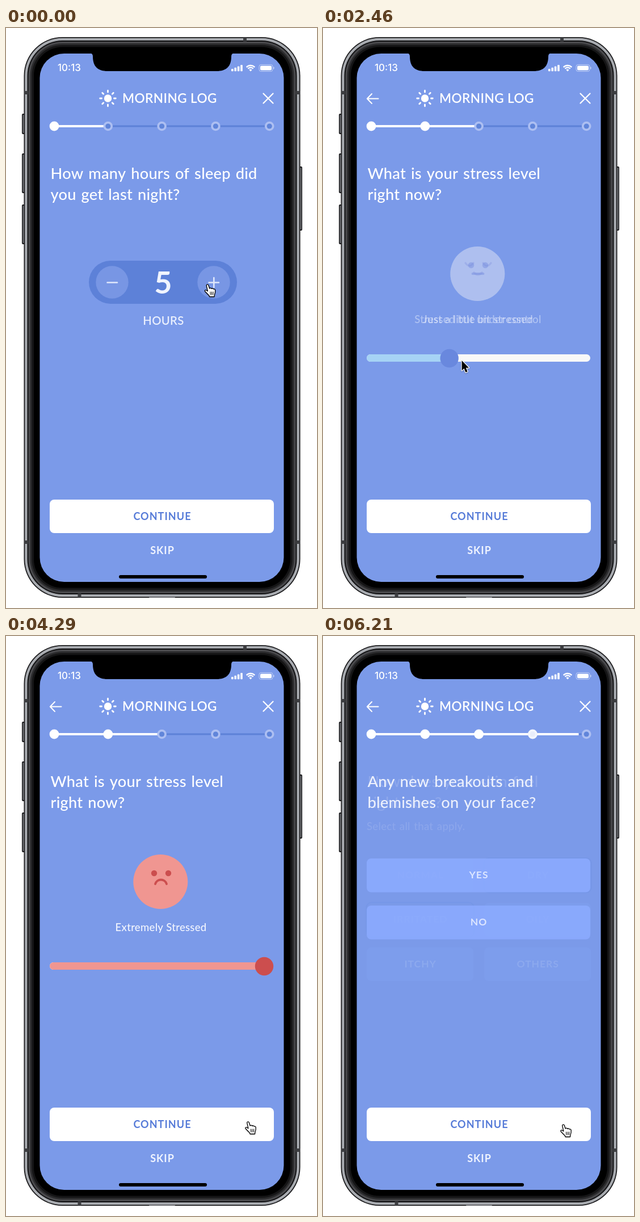
Animation, 548 px wide and 1022 px high, one loop 6.24 s. Source, as an HTML page with a canvas:

```html
<!DOCTYPE html>
<html lang="en">
<head>
<meta charset="utf-8">
<title>Morning log</title>
<style>
html, body { margin: 0; width: 100%; height: 100%; overflow: hidden; background: #fff; }
canvas { display: block; width: 548px; height: 1022px; }
</style>
</head>
<body>
<canvas id="stage"></canvas>
<script>
const LOOP = 6240;
const W = 548, H = 1022;
const BG = '#7b9ae9', DEEP = '#5d81d8', TAG = '#8cabff', WHITE = '#fff';
const canvas = document.getElementById('stage');
const g = canvas.getContext('2d');
const dpr = window.devicePixelRatio || 1;
canvas.width = W * dpr;
canvas.height = H * dpr;

const clamp = v => Math.max(0, Math.min(1, v));
const smooth = p => p * p * (3 - 2 * p);
const lerp = (a, b, p) => a + (b - a) * p;
// Ease-out from 0 to 1, beginning at `start`
const ease = (t, start, dur = 200) => 1 - (1 - clamp((t - start) / dur)) ** 2;
const rgb = c => `rgb(${c.map(Math.round)})`;
const mix = (a, b, p) => a.map((v, i) => lerp(v, b[i], p));

function fade(a, draw) {
  if (a <= 0) return;
  g.save();
  g.globalAlpha *= a;
  draw();
  g.restore();
}

function box(x, y, w, h, r, fill) {
  g.beginPath();
  g.roundRect(x, y, w, h, r);
  g.fillStyle = fill;
  g.fill();
}

function disc(x, y, r, fill) {
  g.beginPath();
  g.arc(x, y, r, 0, 7);
  g.fillStyle = fill;
  g.fill();
}

function stroke(d, color, width, cap = 'round') {
  g.strokeStyle = color;
  g.lineWidth = width;
  g.lineCap = cap;
  g.lineJoin = 'round';
  g.stroke(new Path2D(d));
}

function text(s, x, y, size, o = {}) {
  g.font = `${o.weight || 500} ${size}px ${o.font || 'Lato'}, sans-serif`;
  g.letterSpacing = (o.gap || 0) + 'px';
  g.wordSpacing = (o.word || 0) + 'px';
  g.textAlign = o.align || 'center';
  g.fillStyle = o.color || WHITE;
  g.fillText(s, x, y);
}

// ---- phone ----

function phone() {
  for (const [y, h] of [[151, 36], [221, 70], [311, 70]]) {
    box(28, y, 6, h, 2, '#1c1c1e');
    box(29.5, y + 2, 3, h - 4, 1, '#77797d');
  }
  box(516, 244, 6, 113, 2, '#1c1c1e');
  box(517.5, 246, 3, 109, 1, '#77797d');

  const shells = [[0, '#1d1d1f'], [1.8, '#a9acb1'], [6, '#111113'], [8, '#4a4a4d'], [11, '#2b2b2d'], [14, '#151516'], [17.5, '#000']];
  for (const [i, c] of shells) box(31.5 + i, 16 + i, 487 - 2 * i, 988 - 2 * i, 68 - i, c);

  for (const y of [111, 903]) {
    box(32, y, 7, 6, 0, '#3c3d40');
    box(511, y, 7, 6, 0, '#3c3d40');
  }
  box(418, 16.5, 6, 7, 0, '#3c3d40');
  box(126.5, 996.5, 6, 7, 0, '#3c3d40');
  box(252, 1001.5, 46, 2.5, 1, '#77797d');

  box(59.5, 45, 430, 931, 43, BG);
  g.fillStyle = '#000';
  g.fill(new Path2D('M148 44 Q153 45 153 50 C153 68 162 76 179 76 H371 C388 76 397 68 397 50 Q397 45 402 44 Z'));
}

function statusBar() {
  text('10:13', 91, 76, 17, { font: 'Inter', align: 'left' });
  for (let i = 0; i < 4; i++) box(397 + i * 5.4, 72 - i * 2.3, 3.6, 4.2 + i * 2.3, 1, WHITE);

  g.strokeStyle = WHITE;
  g.lineCap = 'butt';
  g.lineWidth = 2.3;
  for (const r of [6.3, 10]) {
    g.beginPath();
    g.arc(431, 76, r, -Math.PI * 0.76, -Math.PI * 0.24);
    g.stroke();
  }
  g.beginPath();
  g.moveTo(431, 76.5);
  g.arc(431, 76, 3.4, -Math.PI * 0.78, -Math.PI * 0.22);
  g.fillStyle = WHITE;
  g.fill();

  fade(0.5, () => {
    g.beginPath();
    g.roundRect(446, 64.5, 24, 12, 3.5);
    g.lineWidth = 1;
    g.stroke();
    box(471, 68.5, 1.5, 4, 1, WHITE);
  });
  box(448, 66.5, 20, 8, 2, WHITE);
}

// ---- fixed interface ----

function header(back) {
  disc(179.5, 124, 6.7, WHITE);
  for (let i = 0; i < 8; i++) {
    const c = Math.cos(i * Math.PI / 4), s = Math.sin(i * Math.PI / 4);
    stroke(`M${179.5 + 11 * c} ${124 + 11 * s} L${179.5 + 13.8 * c} ${124 + 13.8 * s}`, WHITE, 2.8);
  }
  text('MORNING LOG', 205, 132, 22.5, { weight: 600, gap: 0.45, align: 'left' });
  stroke('M453.5 115.5 L470.5 132.5 M470.5 115.5 L453.5 132.5', WHITE, 2.3);
  fade(back, () => stroke('M97.5 124.5 H78 M86 116 L77.8 124.5 L86 133', WHITE, 2));
}

function stepper(pos) {
  const X = i => 85 + i * 94.8;
  box(X(0), 171.5, X(4) - X(0), 3, 0, DEEP);
  box(X(0), 171, X(Math.min(pos + 1, 4)) - X(0), 4, 0, WHITE);
  for (let i = 0; i < 5; i++) {
    const full = clamp(pos - i + 1);
    if (full < 1) {
      disc(X(i), 173, 8.3, '#adbff2');
      disc(X(i), 173, 4.6, '#6085da');
    }
    fade(full, () => disc(X(i), 173, 8.4, WHITE));
  }
}

function footer() {
  box(77, 831, 395, 59, 8, WHITE);
  text('CONTINUE', 275.5, 867, 18, { weight: 700, gap: 1.05, color: '#567bd8' });
  text('SKIP', 275.5, 927, 18, { weight: 700, gap: 1, color: '#f0f4ff' });
  box(199, 964, 155, 6, 3, '#000');
}

function question(a, b) {
  const o = { align: 'left', gap: 0.25, word: 1.8 };
  text(a, 78.5, 266, 27.2, o);
  text(b, 78.5, 303, 27.2, o);
}

// ---- screens ----

function hours(t) {
  question('How many hours of sleep did', 'you get last night?');
  box(146, 410, 261, 76, 38, DEEP);
  disc(187, 448, 28.7, '#7896e4');
  disc(366, 448, 28.7, '#7896e4');
  stroke('M178.5 448.5 H196 M357.5 448.5 H375 M366.3 440 V457', '#dfe7fb', 2.6);
  const six = ease(t, 135, 100), seven = ease(t, 435, 100);
  const digit = (s, a) => fade(a, () => text(s, 277, 468, 54, { weight: 700, color: '#f0f4fe' }));
  digit('5', 1 - six);
  digit('6', six * (1 - seven));
  digit('7', seven);
  text('HOURS', 277.5, 523, 20.3, { weight: 600, gap: 0.3, color: '#e9effd' });
}

const moods = [
  { label: 'Not stressed at all', face: [172, 192, 246], dark: [72, 108, 210], fill: [166, 211, 245] },
  { label: 'Just a little bit stressed', face: [165, 211, 245], dark: [100, 134, 222], fill: [166, 211, 245] },
  { label: 'Stressed but under control', face: [207, 199, 237], dark: [112, 138, 222], fill: [166, 211, 245] },
  { label: 'Very Stressed', face: [253, 211, 188], dark: [224, 139, 91], fill: [253, 211, 188] },
  { label: 'Extremely Stressed', face: [240, 150, 145], dark: [204, 78, 78], fill: [240, 150, 145] }
];
const mouths = [
  'M263 430 Q273 441 283 430',
  'M266 431 Q273 438 280 431',
  'M263.5 433 H282.5',
  'M267 434.5 C268.5 427 277.5 427 279 434.5',
  'M263 437 C266 427 280 427 283 437'
];
const moodTimes = [2060, 2410, 3250, 3765];

function mood(i) {
  const m = moods[i], dark = rgb(m.dark);
  disc(272.3, 433, 48, rgb(m.face));
  if (i < 2) {
    stroke('M251 414 Q258 424 265 414 M282 414 Q289 424 296 414', dark, 3.2);
  } else {
    disc(261, 418, 5.2, dark);
    disc(286, 418, 5.2, dark);
  }
  stroke(mouths[i], dark, 3.8);
  text(m.label, 273, 520, 18.5, { gap: 0.3, color: '#f2f5fe' });
}

function stress(t) {
  question('What is your stress level', 'right now?');
  const next = moodTimes.filter(s => t >= s).length;
  const last = Math.max(0, next - 1);
  const p = next ? ease(t, moodTimes[next - 1]) : 1;
  if (last !== next) fade(1 - p, () => mood(last));
  fade(p, () => mood(next));

  const x = t < 1850 ? 93 : t > 3900 ? 455 : pointer(t)[0] - 22;
  box(77, 575, 394, 13, 6.5, '#f8f8f8');
  box(77, 575, x - 77, 13, 6.5, rgb(mix(moods[last].fill, moods[next].fill, p)));
  disc(x, 582, 16.2, rgb(mix(moods[last].dark, moods[next].dark, p)));
}

function choice(label, x, y, w, picked = 0) {
  fade(1 - picked, () => box(x, y, w, 59.5, 8, TAG));
  fade(picked, () => {
    g.beginPath();
    g.roundRect(x - 0.5, y - 0.8, w + 1, 61, 9);
    g.strokeStyle = '#5e82da';
    g.lineWidth = 2;
    g.stroke();
  });
  text(label, x + w / 2 + 0.5, y + 35, 17.5, { weight: 700, gap: 0.95, color: '#eaf0ff' });
}

const skinTypes = ['NORMAL', 'DRY', 'IRRITATED', 'OILY', 'ITCHY', 'OTHERS'];

function skin(t) {
  question('How does your skin feel', 'right now?');
  text('Select all that apply.', 77, 342, 18.5, { align: 'left', gap: 0.3, word: 1.5, color: '#eef3fe' });
  const picked = { DRY: ease(t, 5400, 100), IRRITATED: ease(t, 5120, 100) };
  skinTypes.forEach((name, i) =>
    choice(name, 77 + (i % 2) * 207, 392 + (i >> 1) * 78.3, 188.3, picked[name]));
}

function breakouts() {
  question('Any new breakouts and', 'blemishes on your face?');
  choice('YES', 77, 392, 394, 0);
  choice('NO', 77, 475, 394, 0);
}

// ---- pointer ----

// time, x, y of the tip; the slider is dragged between 1850 and 3900
const path = [
  [0, 355, 452], [560, 355, 452], [1000, 357.5, 884], [1090, 357.5, 884],
  [1650, 115, 588], [1850, 115, 588], [2460, 244.5, 586], [3630, 387, 578],
  [3900, 477, 580], [3950, 477, 580], [4230, 426.5, 856], [4640, 426.5, 856],
  [5050, 225, 505], [5200, 225, 505], [5400, 298.8, 415], [5450, 298.8, 415],
  [5900, 423.5, 861], [LOOP, 423.5, 861]
];

function pointer(t) {
  let i = 0;
  while (i < path.length - 2 && t >= path[i + 1][0]) i++;
  const a = path[i], b = path[i + 1];
  let p = clamp((t - a[0]) / (b[0] - a[0]));
  if (a[0] < 1850 || a[0] >= 3900) p = smooth(p);
  return [lerp(a[1], b[1], p), lerp(a[2], b[2], p)];
}

const ARROW = new Path2D('M0 0 V17.5 L4 13.9 L6.8 20.8 L10 19.5 L7.2 12.7 H12.4 Z');
const HAND = new Path2D('M-1.8 1.6 C-1.6 -0.6 1 -0.8 1.8 1.2 L3.6 7 C4.8 5.6 6.6 6 7.2 7.4 C8.6 6.2 10.2 6.8 10.7 8.2 C12.4 7.4 13.6 8.6 13.7 10.4 C14 14 13.2 16 12.4 18 L12 21.5 H3.6 L2.6 19 C0 17 -1.6 14.6 -4.2 12.2 C-5.6 10.4 -3.4 9 -1.8 10.2 L0.4 11.6 Z');

function cursor(t) {
  const [x, y] = pointer(t);
  const overContinue = y > 831 && y < 890;
  const overPlus = t < 1000 && y < 478;
  g.save();
  g.translate(x, y);
  g.lineJoin = 'round';
  g.shadowColor = 'rgba(0,0,0,.3)';
  g.shadowBlur = 2 * dpr;
  g.shadowOffsetY = dpr;
  if (overContinue || overPlus) {
    g.fillStyle = WHITE;
    g.fill(HAND);
    g.shadowColor = 'transparent';
    g.strokeStyle = '#000';
    g.lineWidth = 1.3;
    g.stroke(HAND);
    stroke('M5 13 L5.3 18 M7.6 13 V18 M10.2 13 L9.9 18', '#000', 1);
  } else {
    g.strokeStyle = WHITE;
    g.lineWidth = 2.4;
    g.stroke(ARROW);
    g.shadowColor = 'transparent';
    g.fillStyle = '#000';
    g.fill(ARROW);
  }
  g.restore();
}

// ---- timeline ----

const screens = [hours, stress, skin, breakouts];
const turns = [1062, 4595, 6087];

function draw(t) {
  g.setTransform(dpr, 0, 0, dpr, 0, 0);
  g.fillStyle = WHITE;
  g.fillRect(0, 0, W, H);
  phone();
  statusBar();

  const steps = turns.map(s => ease(t, s));
  header(steps[0]);
  stepper(steps[0] + steps[1] + steps[2]);
  screens.forEach((screen, i) => {
    const shown = i ? steps[i - 1] : 1;
    const gone = i < 3 ? steps[i] : 0;
    fade(shown * (1 - gone), () => screen(t));
  });
  footer();
  cursor(t);
}

const start = performance.now();
function tick() {
  draw((performance.now() - start) % LOOP);
  requestAnimationFrame(tick);
}
tick();
</script>
</body>
</html>
```
